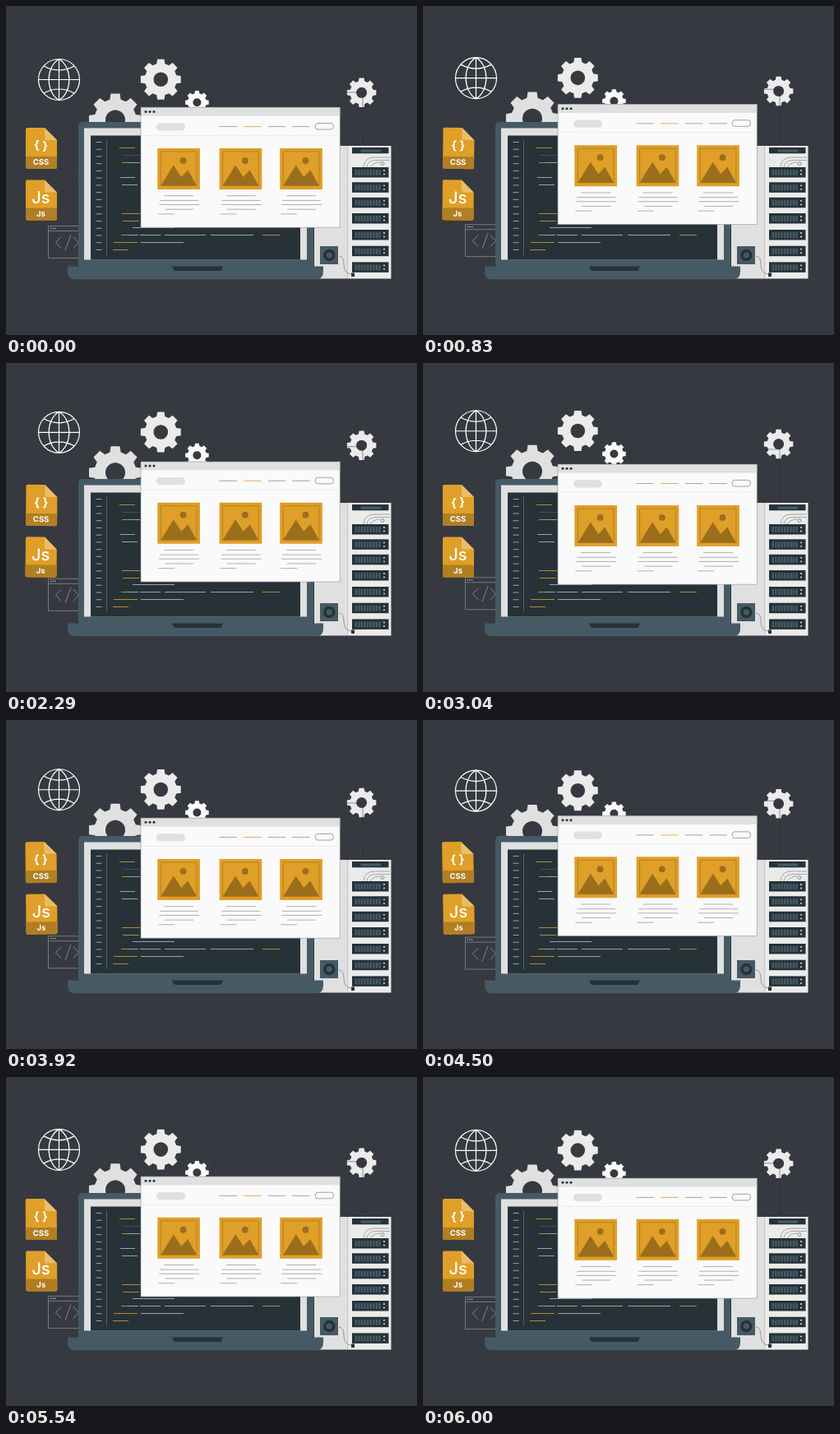
Recreate the animation shown at these times as an HTML page. Size 500x400 px, loop 6.04 s.

```html
<!DOCTYPE html>
<html lang="en">
<head>
<meta charset="utf-8">
<title>Web development</title>
<style>
  html, body { margin: 0; height: 100%; overflow: hidden; background: #363940; }
  svg { display: block; width: 500px; height: 400px; }
  text { font-family: Inter, "Open Sans", sans-serif; fill: #fff; text-anchor: middle; }
</style>
</head>
<body>
<svg id="stage" viewBox="0 0 500 400"></svg>
<script>
const ORANGE = '#df9f28', DARK = '#263238', SLATE = '#455a64', PALE = '#ebebeb', GREY = '#e0e0e0', BG = '#363940';
const LOOP = 6040, RISE = 6.8;

const rect = (x, y, w, h, fill, rx = 0) =>
  `<rect x="${x}" y="${y}" width="${w}" height="${h}" rx="${rx}" fill="${fill}"/>`;
const circle = (x, y, r, fill) => `<circle cx="${x}" cy="${y}" r="${r}" fill="${fill}"/>`;
const shape = (d, fill) => `<path d="${d}" fill="${fill}"/>`;
const stroke = (d, color, width = 0.7) =>
  `<path d="${d}" fill="none" stroke="${color}" stroke-width="${width}"/>`;
const dash = (x1, x2, y, color, width) => stroke(`M${x1} ${y}H${x2}`, color, width);
const label = (x, y, size, weight, text) =>
  `<text x="${x}" y="${y}" font-size="${size}" font-weight="${weight}">${text}</text>`;
const group = (id, content) => `<g id="${id}">${content}</g>`;
const repeat = (n, draw) => Array.from({ length: n }, (_, i) => draw(i)).join('');

// Eight-toothed cog with a round hole.
function gear(x, y, r, hole, fill) {
  const points = [];
  for (let i = 0; i < 8; i++) {
    for (const [offset, radius] of [[-0.26, 0.79], [-0.17, 1], [0.17, 1], [0.26, 0.79]]) {
      const a = i * Math.PI / 4 + offset;
      points.push(`${(x + r * radius * Math.cos(a)).toFixed(2)} ${(y + r * radius * Math.sin(a)).toFixed(2)}`);
    }
  }
  const ring = `M${x - hole} ${y}a${hole} ${hole} 0 1 0 ${2 * hole} 0a${hole} ${hole} 0 1 0 ${-2 * hole} 0z`;
  return `<path fill-rule="evenodd" fill="${fill}" d="M${points.join('L')}z${ring}"/>`;
}

function globe() {
  const d = 'M39.5 89.5a25 25 0 1 0 50 0a25 25 0 1 0 -50 0M39.5 89.5H89.5M64.5 64.5V114.5'
    + 'M64.5 64.5C48 74 48 105 64.5 114.5C81 105 81 74 64.5 64.5'
    + 'M46 73Q64.5 83 83 73M46 106Q64.5 96 83 106';
  return stroke(d, '#fff', 1.2);
}

function codeBox() {
  return stroke('M96 267.5H51.5V306.5H96M51.5 273.5H96', '#a3a5a8', 0.6)
    + repeat(3, i => circle(54.5 + 2.6 * i, 270.4, 0.7, '#ddd'))
    + stroke('M67 280.5L60.5 287.5L67 294.5M79 278L72 297M82 280.5L88.5 287.5L82 294.5', '#a3a5a8');
}

function fileIcon(y, h, big, bigY, size, weight, small) {
  const bottom = y + h;
  return shape(`M26 ${y}H47L62 ${y + 15}V${bottom - 2}q0 2 -2 2H26q-2 0 -2 -2V${y + 2}q0 -2 2 -2z`, ORANGE)
    + shape(`M24 ${bottom - 15}H62V${bottom - 2}q0 2 -2 2H26q-2 0 -2 -2z`, '#b17e22')
    + shape(`M47 ${y}L62 ${y + 15}H49q-2 0 -2 -2z`, '#eabd69')
    + label(42.5, bigY, size, weight, big)
    + label(42.5, bottom - 4.8, 9.5, 700, small);
}

function server() {
  const rack = y => rect(421, y, 44.5, 12.5, DARK)
    + repeat(9, i => rect(424.5 + 3.6 * i, y + 3, 2.5, 7, SLATE))
    + circle(460, y + 4, 0.9, '#fff') + circle(460, y + 8.5, 0.9, '#fff');
  return rect(375, 170, 41, 161.5, GREY) + rect(416, 170, 52.5, 161.5, PALE)
    + stroke('M415.7 170V331', '#aaa', 0.6)
    + rect(421, 172, 44.5, 7.3, DARK) + rect(431.5, 174.5, 24.5, 3.2, SLATE)
    + stroke('M435 196Q436 184 448 184H467M439 196Q440 187.5 450 187.5H467M443 196Q447 190 455 190', '#777', 0.6)
    + `<circle cx="458" cy="191.5" r="2" fill="${PALE}" stroke="#555" stroke-width=".6"/>`
    + [196, 214.3, 232.8, 252, 272, 291.7, 311.4].map(rack).join('')
    + rect(382, 292, 22, 22, SLATE) + circle(393.3, 303, 7.2, DARK) + circle(393.3, 303, 3.6, SLATE)
    + stroke('M405 304Q411 304 411 314Q411 326 421 326', '#777')
    + rect(420, 324.5, 4, 4.5, DARK);
}

function laptop() {
  const white = '#b9c0c3';
  const code = [
    [138, 157, 172.5, ORANGE], [142, 163, 181.5, SLATE], [141, 150, 190.5, ORANGE], [150, 163, 190.5, white],
    [139, 157, 208.5, white], [141, 160, 217.5, white], [141, 163, 252.5, ORANGE], [142, 162, 261.5, ORANGE],
    [154, 205, 269.5, white], [140, 148, 278.5, ORANGE], [148, 161, 278.5, white], [163, 188, 278.5, white],
    [193, 243, 278.5, white], [249, 301, 278.5, white], [312, 333, 278.5, ORANGE], [131, 160, 287.5, ORANGE],
    [164, 216, 287.5, white], [130, 149, 296.5, ORANGE]
  ];
  return rect(88, 141, 286, 178, SLATE, 5)
    + rect(95, 148.5, 271, 160, GREY) + rect(103, 157.5, 255, 151, DARK)
    + stroke('M122.5 162V303', '#62737b', 0.7)
    + repeat(16, i => dash(109.5, 116.5, 165.5 + 8.73 * i, white, 0.8))
    + code.map(([x1, x2, y, color]) => dash(x1, x2, y, color, 0.8)).join('')
    + shape('M75 316.5H386V323q0 9.3 -9 9.3H84q-9 0 -9 -9.3z', SLATE)
    + shape('M202 316.5H264L261.5 322H206.5q-2 0 -3 -2z', DARK);
}

function card(x) {
  const lines = [[8, 44, 230.7], [3, 50, 236.4], [2, 51, 241.5], [9, 44, 247.2], [1, 21, 252.9]];
  return rect(x, 173, 51.7, 50, ORANGE)
    + stroke(`M${x + 4} 177H${x + 47.7}V218.5H${x + 4}z`, '#9b6e1c', 0.6)
    + shape(`M${x + 4} 218.5L${x + 19.5} 193.5L${x + 29} 208L${x + 37} 199.5L${x + 47.7} 218.5z`, '#9b6e1c')
    + circle(x + 31.3, 188, 3.9, '#9b6e1c')
    + lines.map(([a, b, y]) => dash(x + a, x + b, y, '#8c9194', 0.7)).join('');
}

function browser() {
  return rect(164, 123.3, 242.3, 146, '#fafafa') + rect(164, 123.3, 242.3, 10.4, GREY)
    + stroke('M164 123.3H406.3V269.3H164z', '#8b8f92', 0.6)
    + repeat(3, i => circle(170 + 5 * i, 128.4, 1.5, DARK))
    + rect(183, 142.2, 35, 9.3, GREY, 4.6)
    + repeat(4, i => dash(259.5 + 29.6 * i, 281 + 29.6 * i, 146.6, i === 1 ? ORANGE : '#8c9194', 0.8))
    + '<rect x="376.3" y="142.5" width="22" height="7.6" rx="3" fill="none" stroke="#777d80" stroke-width=".7"/>'
    + dash(167, 406, 157.5, '#e6e6e6', 0.7)
    + [184.3, 259.6, 333.2].map(card).join('');
}

function connectors() {
  return stroke('M252 116V105H434V166', DARK, 0.5)
    + circle(252, 116, 1, DARK) + circle(434, 166, 1.2, DARK) + circle(84, 207.5, 1, DARK);
}

document.getElementById('stage').innerHTML = rect(0, 0, 500, 400, BG)
  + group('backdrop', globe() + codeBox()
    + gear(133, 138.5, 32.5, 12, GREY) + gear(188.3, 89.2, 24.8, 8.8, PALE)
    + gear(232.4, 117.3, 14.5, 5, '#fafafa') + gear(432.6, 105.3, 18, 6.5, PALE))
  + group('links', connectors())
  + server() + laptop()
  + group('page', browser())
  + group('files', fileIcon(148, 50, '{ }', 174.5, 14.5, 700, 'CSS') + fileIcon(211.5, 49, 'Js', 240, 20, 500, 'Js'));

const move = (id, value) => document.getElementById(id).setAttribute('transform', value);
const lift = p => -RISE * (1 - Math.abs(1 - 2 * (p % 1)));

function draw() {
  const p = performance.now() % LOOP / LOOP;
  const tilt = Math.asin(Math.sin(2 * Math.PI * p)) * 2 / Math.PI;
  move('backdrop', `translate(0 ${lift(p)})`);
  move('links', `translate(0 ${lift(2 * p)})`);
  move('page', `translate(0 ${lift(2 * p)})`);
  move('files', `rotate(${tilt} 43 204)`);
  requestAnimationFrame(draw);
}
draw();
</script>
</body>
</html>
```
